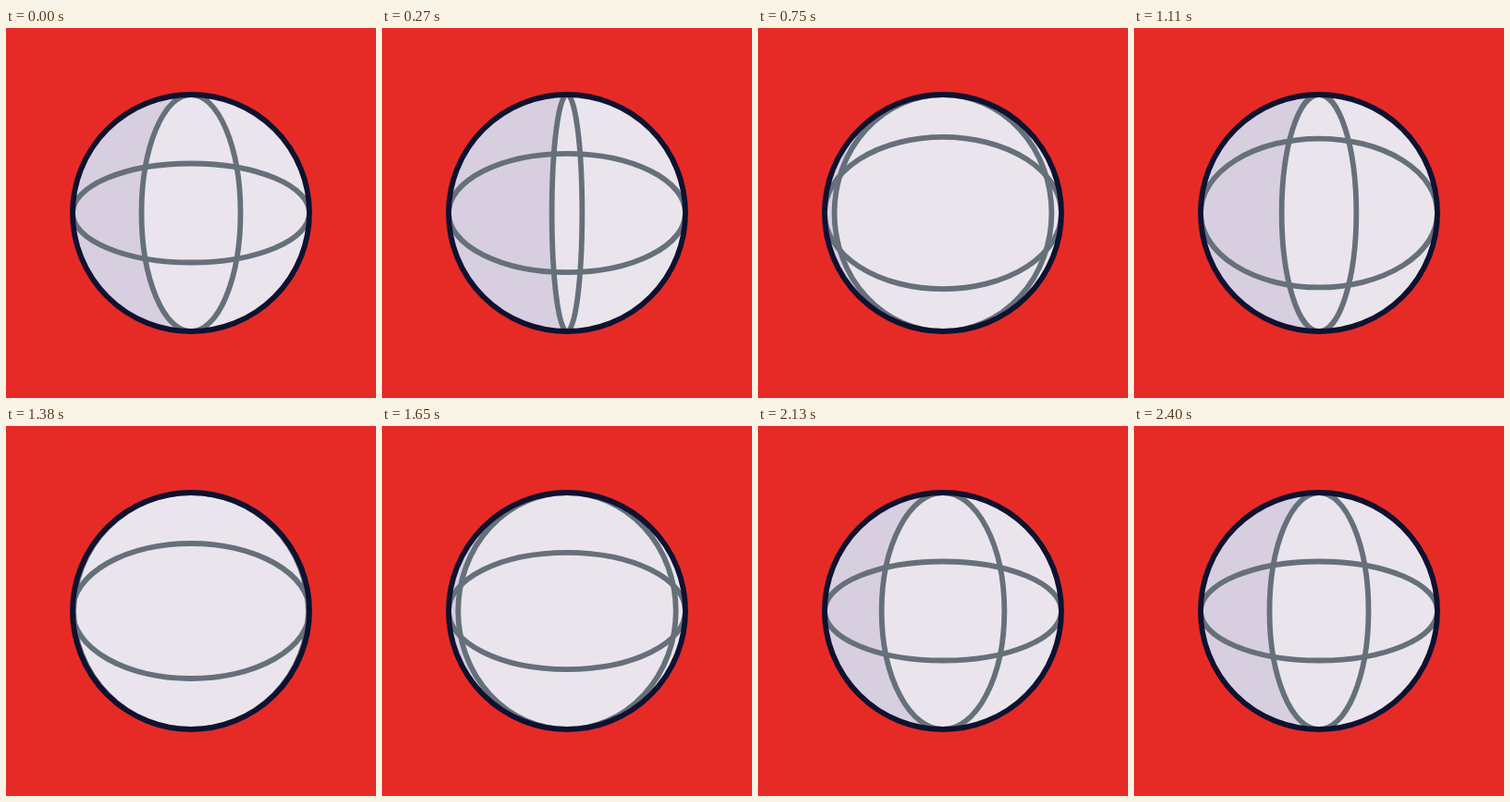
Recreate the animation shown at these times as an HTML page. Size 400 px wide and 400 px high, loop 4460 ms.

```html
<!DOCTYPE html>
<html lang="en">
<head>
<meta charset="utf-8">
<title>Spinning globe</title>
<style>
  html, body { margin: 0; width: 100%; height: 100%; overflow: hidden; background: #e62b26; }
  svg { display: block; width: 100%; height: 100%; stroke-width: 5.8; }
  .line { stroke: #65707a; }
</style>
</head>
<body>
<svg viewBox="0 0 400 400">
  <circle cx="200" cy="200" r="128" fill="#eae5ec"/>
  <path d="M200 72A128 128 0 0 0 200 328Z" fill="#d7cfdf"/>
  <ellipse id="meridian" class="line" cx="200" cy="200" ry="128" fill="#eae5ec"/>
  <ellipse id="parallel" class="line" cx="200" cy="200" rx="128" fill="none"/>
  <circle cx="200" cy="200" r="128" fill="none" stroke="#0f1130"/>
</svg>
<script>
const LOOP = 4460, STEP = 30, END = 2400;
const R = 128, REST = 53.5, RISE = 28.7;
const SPEED = 0.237, LAG = 169, SETTLE = 1410; // degrees per ms, ms, ms

// Sine ease from 0 to 1 between two times
function ease(t, from, to) {
  const x = Math.min(1, Math.max(0, (t - from) / (to - from)));
  return (1 - Math.cos(Math.PI * x)) / 2;
}

// The globe gathers speed and spins, then its meridian narrows to the rest width
function width(t) {
  if (t >= SETTLE) return R + (REST - R) * ease(t, SETTLE, END);
  const turned = SPEED * (t - LAG * (1 - Math.exp(-t / LAG)));
  return R * Math.abs(Math.sin(Math.asin(REST / R) - turned * Math.PI / 180));
}

// The globe tips forward and slowly back
function height(t) {
  return REST + RISE * (ease(t, 0, 645) - ease(t, 920, 2120));
}

const meridian = document.getElementById('meridian');
const parallel = document.getElementById('parallel');
const start = performance.now();

function draw() {
  const now = Math.max(0, performance.now() - start) % LOOP;
  const t = Math.min(END, Math.floor(now / STEP) * STEP);
  meridian.setAttribute('rx', Math.max(0.01, width(t)));
  parallel.setAttribute('ry', height(t));
  requestAnimationFrame(draw);
}
draw();
</script>
</body>
</html>
```
